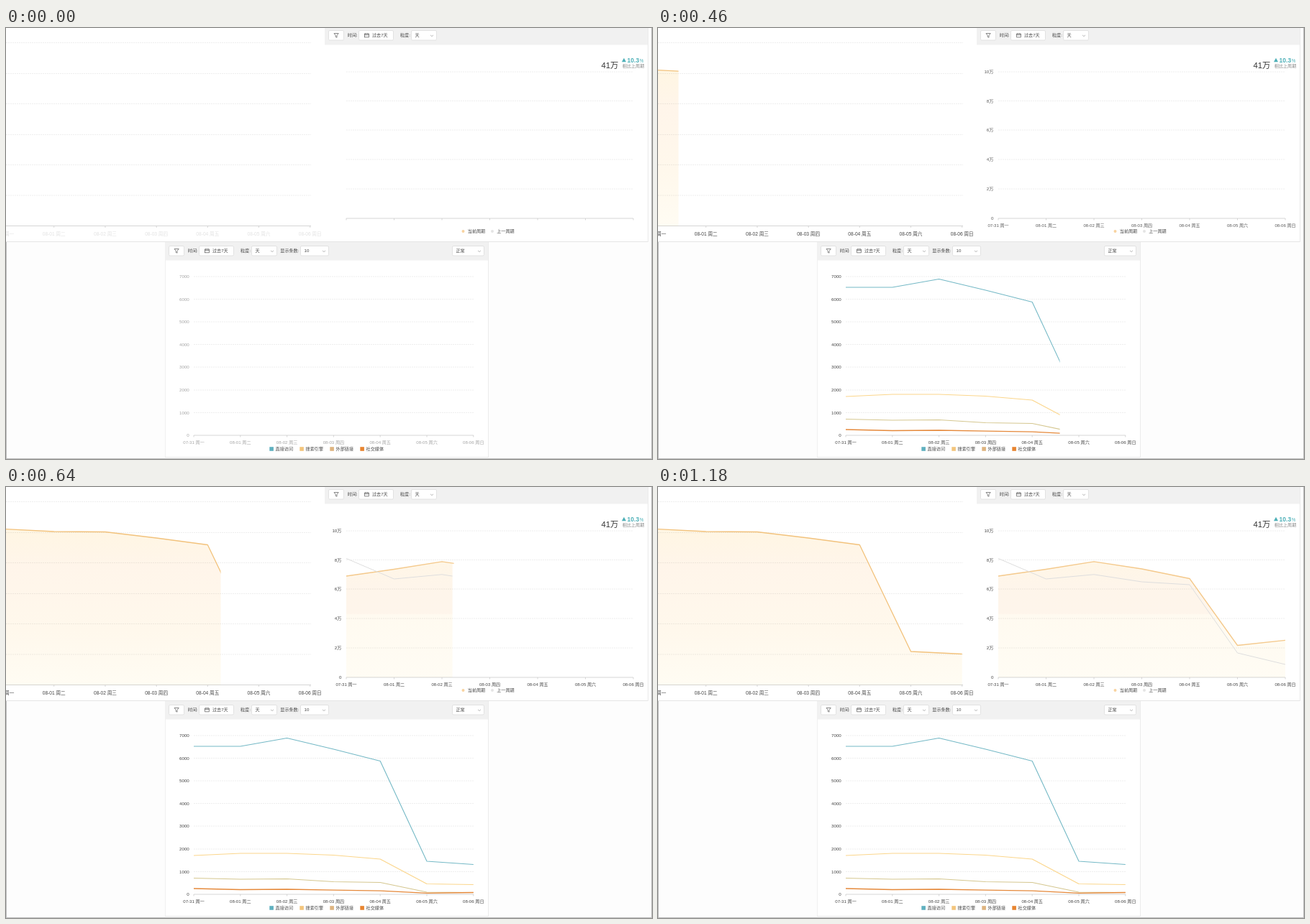
Animation of 898 by 600 pixels, one loop 1200 ms. Source, as an HTML page with a canvas:

```html
<!DOCTYPE html>
<html lang="zh-CN">
<head>
<meta charset="utf-8">
<title>Trend charts</title>
<style>
html, body { margin: 0; width: 100%; height: 100%; overflow: hidden; background: #fff; }
canvas { display: block; width: 898px; height: 600px; }
</style>
</head>
<body>
<canvas id="stage" width="898" height="600"></canvas>
<script>
const ctx = document.getElementById('stage').getContext('2d');
const LOOP = 1200;
const FADE = 520;
const FONT = '"Liberation Sans", "Noto Sans CJK SC", "Noto Sans CJK JP", sans-serif';
const DAYS = [...'一二三四五六日'].map((d, i) => `${['07-31', '08-01', '08-02', '08-03', '08-04', '08-05', '08-06'][i]} 周${d}`);

// Each chart fades its labels in, then reveals its series at constant speed.
const charts = [
  {
    x: -4.5, step: 71.2, left: 0, right: 424, axis: 275.5,
    grid: [20.5, 63.5, 105.5, 148.5, 190.5, 233], ticks: [],
    labelY: 286.5, size: 6.6, start: 439, speed: 1.5,
    fill: [58, '#fff6e3', 110, '#fff5ea', 200, '#fff8ec', 275, '#fffcf3'],
    series: [{ color: '#f2c27c', width: 1.3, area: true, ys: [58.3, 62, 62.5, 71, 80.5, 229, 232.5] }]
  },
  {
    x: 473, step: 66.5, left: 473, right: 872, axis: 265,
    grid: [61, 101.5, 142, 183, 224], ticks: ['10万', '8万', '6万', '4万', '2万', '0'], tickX: 466.5,
    labelY: 275, size: 6.05, start: 519, speed: 1.21,
    fill: [103, '#fff6e6', 135, '#fef5ea', 176, '#fef5eb', 178, '#fffaf0', 265, '#fffcf4'],
    series: [
      { color: '#f4c98c', width: 1.3, area: true, lead: 2, ys: [124, 114.5, 103.8, 114, 127.5, 220.5, 213.3] },
      { color: '#dedede', width: 1, ys: [99.5, 128, 121.8, 132, 136, 231, 247] }
    ]
  },
  {
    x: 261, step: 64.8, left: 261, right: 650, axis: 567,
    grid: [346, 377.5, 409, 440.5, 472, 504, 535.5],
    ticks: ['7000', '6000', '5000', '4000', '3000', '2000', '1000', '0'], tickX: 254.8,
    labelY: 577, size: 6.1, start: 270, speed: 1.558,
    series: [
      { color: '#75b9c6', width: 1.1, ys: [361, 361, 349.5, 365, 381.5, 521, 525.5] },
      { color: '#fbd68c', width: 1.2, ys: [513, 510, 510, 512.5, 518, 552.5, 553.5] },
      { color: '#d5c790', width: 1.1, ys: [544.5, 546, 545.5, 549.5, 550.5, 564, 564.5] },
      { color: '#e5893b', width: 1.3, ys: [559, 560.5, 560, 561.2, 562.2, 565.3, 564.5] }
    ]
  }
];

function rect(x, y, w, h, color) {
  ctx.fillStyle = color;
  ctx.fillRect(x, y, w, h);
}

function path(points, color, width = 1) {
  ctx.beginPath();
  points.forEach(([x, y]) => ctx.lineTo(x, y));
  ctx.strokeStyle = color;
  ctx.lineWidth = width;
  ctx.stroke();
}

function text(str, x, y, { size = 6.1, color = '#444', align = 'left', weight = '' } = {}) {
  ctx.font = `${weight} ${size}px ${FONT}`;
  ctx.textAlign = align;
  ctx.textBaseline = 'alphabetic';
  ctx.fillStyle = color;
  ctx.fillText(str, x, y + size * 0.36);
}

function dot(x, y, color) {
  ctx.beginPath();
  ctx.arc(x, y, 2, 0, Math.PI * 2);
  ctx.fillStyle = color;
  ctx.fill();
}

function box(x, y, w) {
  ctx.beginPath();
  ctx.roundRect(x + 0.5, y + 3.5, w - 1, 13.5, 1.5);
  ctx.fillStyle = '#fff';
  ctx.fill();
  ctx.strokeStyle = '#e2e2e2';
  ctx.lineWidth = 1;
  ctx.stroke();
}

function select(label, x, y, w) {
  box(x, y, w);
  text(label, x + 5.5, y + 10.3);
  const cx = x + w - 7;
  path([[cx - 2, y + 9.8], [cx, y + 11.7], [cx + 2, y + 9.8]], '#999', 0.7);
}

function toolbar(x, y) {
  box(x, y, 22);
  path([[x + 8, y + 7.5], [x + 14.2, y + 7.5], [x + 12, y + 10.4], [x + 12, y + 13.2],
    [x + 10.2, y + 12.4], [x + 10.2, y + 10.4], [x + 8, y + 7.5]], '#555', 0.7);
  text('时间:', x + 26.8, y + 10.3);
  box(x + 42, y, 49);
  ctx.strokeStyle = '#555';
  ctx.lineWidth = 0.7;
  ctx.strokeRect(x + 50.4, y + 8, 6, 4.8);
  path([[x + 50.4, y + 9.6], [x + 56.4, y + 9.6]], '#555', 0.7);
  path([[x + 52, y + 7], [x + 52, y + 8.4]], '#555', 0.7);
  path([[x + 54.8, y + 7], [x + 54.8, y + 8.4]], '#555', 0.7);
  text('过去7天', x + 61, y + 10.3);
  text('粒度:', x + 100, y + 10.3);
  select('天', x + 115, y, 36);
}

function drawPage() {
  rect(0, 0, 898, 600, '#fdfdfd');
  rect(0, 0, 893, 297, '#fff');
  rect(221, 298, 450, 300, '#fff');
  rect(443, 0, 450, 23.5, '#f1f1f1');
  rect(221, 298, 450, 25.5, '#f1f1f1');
  rect(0, 297, 893, 1, '#e6e6e6');
  rect(892, 0, 1, 298, '#ebebeb');
  rect(221, 298, 1, 300, '#f0f0f0');
  rect(670, 298, 1, 300, '#ebebeb');
  rect(221, 597, 450, 1, '#ececec');
  rect(0, 298, 1, 302, '#bdbdbd');
  rect(897, 0, 1, 600, '#bdbdbd');
  rect(0, 599, 898, 1, '#bdbdbd');

  toolbar(448, 0);
  toolbar(226, 300);
  text('显示条数:', 381.3, 310.3);
  select('10', 409, 300, 40);
  select('正常', 620, 300, 45);

  text('41万', 851.3, 51.7, { size: 11.3, color: '#333', align: 'right' });
  ctx.beginPath();
  [[856, 47.3], [859, 41.7], [862, 47.3]].forEach(p => ctx.lineTo(...p));
  ctx.fillStyle = '#4db0b8';
  ctx.fill();
  text('10.3', 863.6, 44.6, { size: 8.5, color: '#4db0b8', weight: 'bold' });
  text('%', 880.8, 45.3, { size: 6.3, color: '#4db0b8' });
  text('相比上周期', 856.8, 53, { color: '#888' });

  dot(635.5, 283, '#f8d3a0');
  text('当前周期', 641.8, 283);
  dot(676, 283, '#e4e4e4');
  text('上一周期', 682.2, 283);

  const legend = [['直接访问', '#5fb0bf'], ['搜索引擎', '#f3c57c'], ['外部链接', '#deb47f'], ['社交媒体', '#e8842f']];
  legend.forEach(([label, color], i) => {
    rect(366.3 + i * 42, 583.2, 5.6, 5.6, color);
    text(label, 374.6 + i * 42, 586.2);
  });
}

function drawSeries(chart, time) {
  const edge = chart.x + Math.max(0, time - chart.start) * chart.speed;
  if (edge <= chart.x) return;
  const pointsOf = s => s.ys.map((y, i) => [chart.x + i * chart.step, y]);
  const clipped = (limit, draw) => {
    ctx.save();
    ctx.beginPath();
    ctx.rect(chart.x - 1, 0, Math.min(limit, chart.right) - chart.x + 1, 600);
    ctx.clip();
    draw();
    ctx.restore();
  };

  for (const s of chart.series.filter(s => s.area)) {
    clipped(edge, () => {
      const [top, , ...rest] = chart.fill;
      const span = rest[rest.length - 2] - top;
      const gradient = ctx.createLinearGradient(0, top, 0, top + span);
      for (let i = 0; i < chart.fill.length; i += 2) {
        gradient.addColorStop((chart.fill[i] - top) / span, chart.fill[i + 1]);
      }
      const points = pointsOf(s);
      ctx.beginPath();
      points.forEach(p => ctx.lineTo(...p));
      ctx.lineTo(points[6][0], chart.axis);
      ctx.lineTo(chart.x, chart.axis);
      ctx.globalCompositeOperation = 'multiply';
      ctx.fillStyle = gradient;
      ctx.fill();
    });
  }
  ctx.lineJoin = 'round';
  for (const s of chart.series) {
    clipped(edge + (s.lead || 0), () => path(pointsOf(s), s.color, s.width));
  }
}

function drawChart(chart, time) {
  ctx.setLineDash([2, 1]);
  chart.grid.forEach(y => path([[chart.left, y], [chart.right, y]], '#ececec', 0.9));
  ctx.setLineDash([]);
  path([[chart.left, chart.axis], [chart.right, chart.axis]], '#d2d2d2', 0.9);
  DAYS.forEach((_, i) => {
    const x = chart.x + i * chart.step;
    path([[x, chart.axis], [x, chart.axis + 2.5]], '#ccc', 0.8);
  });

  drawSeries(chart, time);

  ctx.globalAlpha = Math.min(1, Math.max(0, 1 - (chart.start - time) / FADE));
  DAYS.forEach((label, i) => {
    text(label, chart.x + i * chart.step, chart.labelY, { size: chart.size, align: 'center' });
  });
  chart.ticks.forEach((label, i) => {
    text(label, chart.tickX, chart.grid[i] ?? chart.axis, { size: 6.2, align: 'right' });
  });
  ctx.globalAlpha = 1;
}

function frame() {
  const time = performance.now() % LOOP;
  drawPage();
  charts.forEach(chart => drawChart(chart, time));
  requestAnimationFrame(frame);
}
frame();
</script>
</body>
</html>
```
